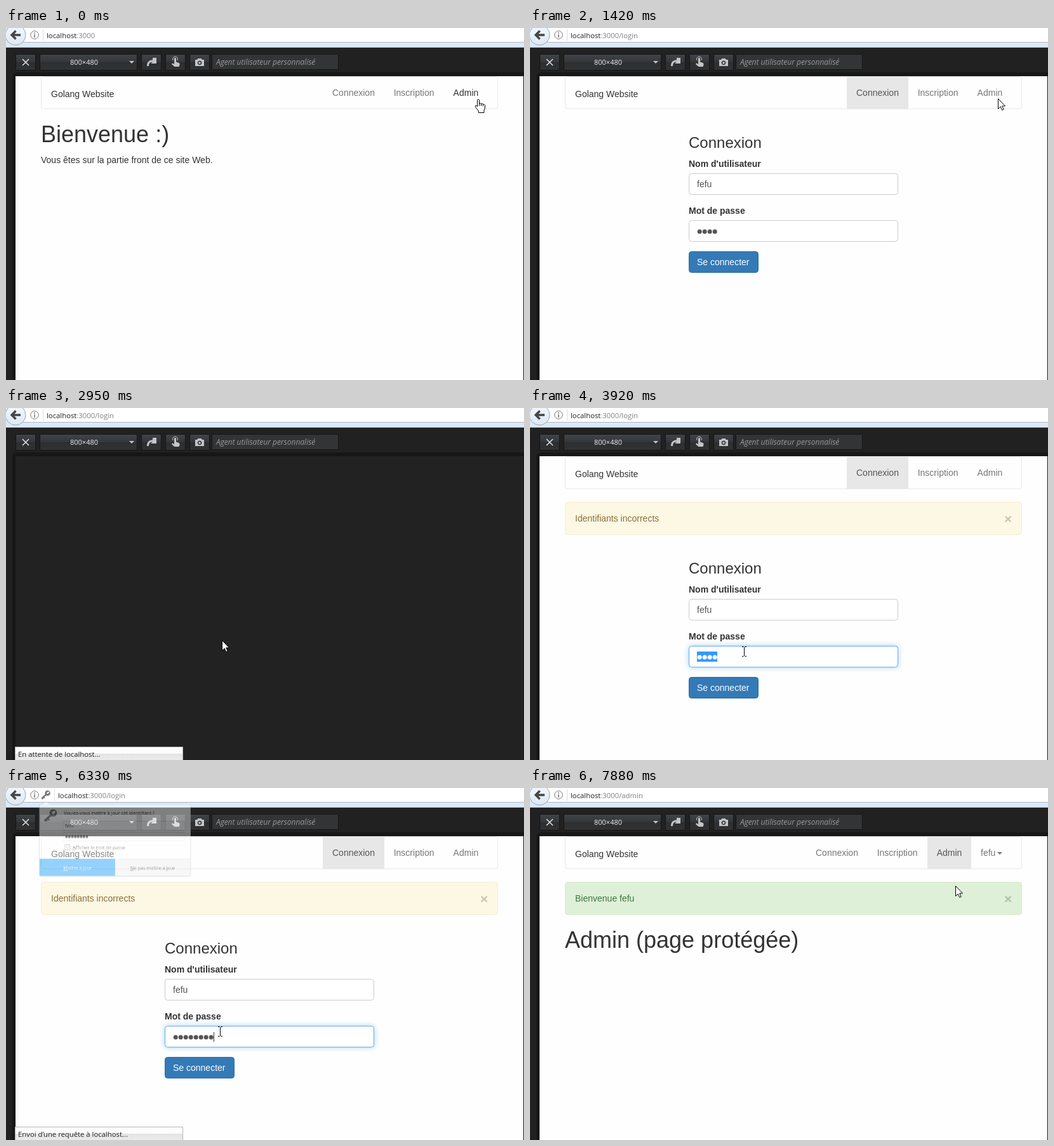
An HTML page for the animation above (8 s loop, 816 by 555 pixels).

```html
<!DOCTYPE html>
<html lang="fr">
<head>
<meta charset="utf-8">
<title>Golang Website</title>
<style>
html, body { margin: 0; width: 100%; height: 100%; overflow: hidden; background: #212121; }
svg { display: block; width: 816px; height: 555px; }
text { font: 14px "Liberation Sans", Arial, sans-serif; fill: #333; white-space: pre; }
.ui text, text.ui { font: 11.3px "Open Sans", "Noto Sans", sans-serif; fill: #222; }
.url .path { fill: #808080; }
.nav text { fill: #777; }
.nav .brand { font-size: 18px; }
.nav .on { fill: #555; }
.nav .hover { fill: #333; }
.h1 { font-size: 36px; }
.h3 { font-size: 24px; }
.b { font-weight: bold; }
.x { font-size: 21px; font-weight: bold; fill: #000; opacity: .2; }
.u { text-decoration: underline; }
.field { fill: #fff; stroke: #ccc; }
.value { fill: #555; }
.dots { fill: none; stroke: #555; stroke-width: 7; stroke-linecap: round; stroke-dasharray: 0 8; }
.focus { fill: #fff; stroke: #66afe9; filter: drop-shadow(0 0 4px rgba(102,175,233,.6)); }
.key { fill: none; stroke: #6e6e6e; }

/* One percent of the loop is 80 ms. */
.t { animation: 8s step-end -10ms infinite; }
#home, #urlHome { animation-name: home; }
#urlLogin { animation-name: urlLogin; }
#urlAdmin { animation-name: urlAdmin; }
#url { animation-name: urlShift; }
#urlKey { animation-name: urlKey; }
#paper { animation-name: paper; }
#login { animation-name: login; }
#form { animation-name: form; }
#alert { animation-name: alert; }
#button { animation-name: button; }
#glow { animation-name: glow; }
#typed { animation-name: typed; }
#caret { animation-name: caret; }
#selection { animation-name: selection; }
#admin { animation-name: admin; }
#wait { animation-name: wait; }
#send { animation-name: send; }
#receive { animation-name: receive; }
#popup { animation-name: popup; transform-origin: 62.5px 21px; }
#cursor { animation-name: move; }
#arrow { animation-name: arrow; }
#hand { animation-name: hand; }
#beam { animation-name: beam; }

@keyframes home { 0% { opacity: 1 } 15.875%, 100% { opacity: 0 } }
@keyframes urlLogin { 0% { opacity: 0 } 15.875% { opacity: 1 } 80.875%, 100% { opacity: 0 } }
@keyframes urlAdmin { 0% { opacity: 0 } 80.875%, 100% { opacity: 1 } }
@keyframes urlShift { 0% { transform: none } 79.125% { transform: translateX(18px) } 98.5%, 100% { transform: none } }
@keyframes urlKey { 0% { opacity: 0 } 79.125% { opacity: 1 } 98.5%, 100% { opacity: 0 } }
@keyframes paper {
  0%, 17.75%, 38.625%, 82.5%, 100% { opacity: 1 }
  15.875%, 36.875%, 80.875% { opacity: 0 }
}
@keyframes login { 0%, 36.875%, 80.875%, 100% { opacity: 0 } 17.75%, 38.625% { opacity: 1 } }
@keyframes form { 0% { transform: none } 36.875%, 100% { transform: translateY(72px) } }
@keyframes alert { 0% { opacity: 0 } 36.875%, 100% { opacity: 1 } }
@keyframes button {
  0%, 36.875%, 100% { fill: #337ab7; stroke: #2e6da4 }
  33.375% { fill: #286090; stroke: #204d74 }
  35% { fill: #204d74; stroke: #122b40 }
}
@keyframes glow { 0% { opacity: 0 } 45.875% { opacity: .6 } 47.5%, 100% { opacity: 1 } }
@keyframes typed {
  0% { transform: translateX(32px) }
  63.75% { transform: translateX(8px) }
  67.25% { transform: translateX(16px) }
  69% { transform: translateX(24px) }
  70.75% { transform: translateX(32px) }
  72.5% { transform: translateX(40px) }
  74.25% { transform: translateX(56px) }
  75.875%, 100% { transform: translateX(64px) }
}
@keyframes caret { 0%, 49% { opacity: 0 } 45.875%, 63.75%, 100% { opacity: 1 } }
@keyframes selection { 0% { opacity: 0 } 49% { opacity: 1 } 63.75%, 100% { opacity: 0 } }
@keyframes admin { 0% { opacity: 0 } 84.375%, 100% { opacity: 1 } }
@keyframes wait {
  0%, 17.75%, 38.625%, 82.5%, 100% { opacity: 0 }
  2%, 36.875%, 80.875% { opacity: 1 }
}
@keyframes send { 0% { opacity: 0 } 79.125% { opacity: 1 } 80.875%, 100% { opacity: 0 } }
@keyframes receive { 0% { opacity: 0 } 82.5% { opacity: 1 } 84.375%, 100% { opacity: 0 } }
@keyframes popup {
  0% { opacity: 0; transform: none }
  79.125% { opacity: .43; transform: scale(.656) }
  80.875% { opacity: 1; transform: none }
  96.75% { opacity: .5; transform: none }
  98.5%, 100% { opacity: 0; transform: none }
}
@keyframes move {
  0% { transform: translate(744px, 112px) }
  3.75% { transform: translate(737px, 111px) }
  24.75% { transform: translate(704px, 153px) }
  26.5% { transform: translate(600px, 225px) }
  28.25% { transform: translate(480px, 300px) }
  30% { transform: translate(395px, 345px) }
  31.625% { transform: translate(355px, 362px) }
  33.375% { transform: translate(340px, 366px) }
  44.125% { transform: translate(338px, 378px) }
  45.875% { transform: translate(337px, 384px) }
  80.875% { transform: translate(335px, 383px) }
  87.875% { transform: translate(352px, 375px) }
  89.625% { transform: translate(420px, 320px) }
  91.375% { transform: translate(520px, 240px) }
  93.125% { transform: translate(620px, 180px) }
  94.875%, 100% { transform: translate(670px, 154px) }
}
@keyframes arrow { 0%, 33.375%, 44.125% { opacity: 0 } 3.75%, 36.875%, 80.875%, 100% { opacity: 1 } }
@keyframes hand { 0%, 33.375% { opacity: 1 } 3.75%, 36.875%, 100% { opacity: 0 } }
@keyframes beam { 0%, 80.875%, 100% { opacity: 0 } 44.125% { opacity: 1 } }
</style>
</head>
<body>
<svg viewBox="0 0 816 555">
  <defs>
    <linearGradient id="metal" x2="0" y2="1">
      <stop offset="0" stop-color="#404347"/><stop offset=".5" stop-color="#34373a"/>
      <stop offset=".5" stop-color="#2c2e30"/><stop offset="1" stop-color="#303234"/>
    </linearGradient>
    <linearGradient id="bar" x2="0" y2="1">
      <stop offset="0" stop-color="#fff"/><stop offset=".5" stop-color="#fbfbfb"/>
      <stop offset=".5" stop-color="#e4e4e4"/><stop offset="1" stop-color="#ececec"/>
    </linearGradient>
    <linearGradient id="round" x2="0" y2="1">
      <stop offset="0" stop-color="#f4f8fd"/><stop offset="1" stop-color="#dce8f5"/>
    </linearGradient>
    <g id="frame">
      <rect x="55.5" y="76.5" width="719" height="51" rx="4" fill="none" stroke="#e7e7e7"/>
      <text class="brand" x="71" y="109">Golang Website</text>
    </g>
    <g id="keyIcon" class="key">
      <circle cx="80.500" cy="49" r="6" stroke-width="6"/>
      <circle cx="83" cy="46.500" r="2.500" fill="#fff" stroke="none"/>
      <path d="M75 54L60 68" stroke-width="5"/>
      <path d="M67 62l4 4M62 66l3 3" stroke-width="3.500"/>
    </g>
  </defs>

  <!-- browser chrome -->
  <rect width="816" height="555" fill="#212121"/>
  <rect width="816" height="31" fill="#dbe9f8"/>
  <rect x="18" width="798" height="22" fill="#fff"/>
  <path d="M18 22.500H816" stroke="#a9b7c6"/>
  <path d="M0 30.500H816" stroke="#b4c1cf"/>
  <circle cx="15" cy="11" r="16" fill="url(#round)" stroke="#9aa5b1"/>
  <path d="M9.500 11H23M15.500 4.500L9 11l6.500 6.500" fill="none" stroke="#454545" stroke-width="3.400"/>
  <circle cx="45" cy="11" r="6.300" fill="#fff" stroke="#777"/>
  <path d="M45 7v1.700M45 10v5" stroke="#777" stroke-width="1.600"/>

  <!-- responsive toolbar -->
  <g fill="url(#metal)" stroke="#151515">
    <rect x="15.500" y="41.500" width="31" height="25"/>
    <rect x="53.500" y="41.500" width="153" height="25"/>
    <rect x="213.500" y="41.500" width="31" height="25"/>
    <rect x="251.500" y="41.500" width="31" height="25"/>
    <rect x="289.500" y="41.500" width="31" height="25"/>
    <rect x="324.500" y="41.500" width="199" height="24" rx="1" fill="#333436"/>
  </g>
  <path d="M26 49l10 10M36 49l-10 10" stroke="#e4e4e4" stroke-width="1.500"/>
  <g fill="#c3c5c7">
    <path d="M194 52h8l-4 4z"/>
    <path d="M222 60c0-7 4-9.500 9-9.500V47l6 0v9h-9l3-2.500c-4 0-6 2-6 6.500z"/>
    <path d="M265 47.500q1.500-1 3 0v6l4.500 1.500q1.500 1 1 3l-1 3h-7l-4.500-4q0-1.500 1.500-1.500l2.500 1.500z"/>
    <path fill-rule="evenodd" d="M298 50h3l1.500-2h5l1.500 2h3v10h-14zM305 51.500a3.400 3.400 0 1 0 .1 0z"/>
    <circle cx="305" cy="55" r="1.800"/>
  </g>
  <path d="M263 51a4 4 0 1 1 7 0" fill="none" stroke="#c3c5c7"/>
  <g class="ui">
    <text x="123" y="58" text-anchor="middle" style="font-size:11px;fill:#eee">800×480</text>
    <text x="331" y="58" style="font-size:12px;font-style:italic;fill:#999">Agent utilisateur personnalisé</text>
  </g>

  <g id="url" class="t">
    <path d="M58.500 2V20" stroke="#ddd"/>
    <g class="ui url">
      <text id="urlHome" class="t" x="64" y="16">localhost<tspan class="path">:3000</tspan></text>
      <text id="urlLogin" class="t" x="64" y="16">localhost<tspan class="path">:3000/login</tspan></text>
      <text id="urlAdmin" class="t" x="64" y="16">localhost<tspan class="path">:3000/admin</tspan></text>
    </g>
  </g>
  <g id="urlKey" class="t"><use href="#keyIcon" transform="translate(28.500 -14.500) scale(.46)"/></g>

  <!-- viewport -->
  <path d="M10 555V78q0-8 8-8H816V555z" fill="#171717"/>
  <rect x="15" y="76" width="800" height="479" fill="#222"/>
  <rect id="paper" class="t" x="15" y="76" width="800" height="479" fill="#fefefe"/>

  <g id="home" class="t">
    <g class="nav">
      <use href="#frame"/>
      <text x="514" y="107">Connexion</text>
      <text x="610.700" y="107">Inscription</text>
      <text class="hover" x="704.600" y="107">Admin</text>
    </g>
    <text class="h1" x="55" y="180">Bienvenue :)</text>
    <text x="55" y="213">Vous êtes sur la partie front de ce site Web.</text>
  </g>

  <g id="login" class="t">
    <g class="nav">
      <use href="#frame"/>
      <rect x="499" y="77" width="97" height="50" fill="#e7e7e7"/>
      <text class="on" x="514" y="107">Connexion</text>
      <text x="610.700" y="107">Inscription</text>
      <text x="704.600" y="107">Admin</text>
    </g>
    <g id="alert" class="t">
      <rect x="55.500" y="148.500" width="719" height="51" rx="4" fill="#fcf8e3" stroke="#faebcc"/>
      <text x="71" y="179" style="fill:#8a6d3b">Identifiants incorrects</text>
      <text class="x" x="747" y="181.500">×</text>
    </g>
    <g id="form" class="t">
      <text class="h3" x="250" y="189">Connexion</text>
      <text class="b" x="250" y="219">Nom d'utilisateur</text>
      <rect class="field" x="250.500" y="229.500" width="329" height="33" rx="4"/>
      <text class="value" x="263" y="251">fefu</text>
      <text class="b" x="250" y="293">Mot de passe</text>
      <rect class="field" x="250.500" y="303.500" width="329" height="33" rx="4"/>
      <rect id="glow" class="t focus" x="250.500" y="303.500" width="329" height="33" rx="4"/>
      <path class="dots" d="M267.200 321h57"/>
      <g id="typed" class="t">
        <rect x="263" y="313" width="70" height="16" fill="#fff"/>
        <path id="caret" class="t" d="M263.500 313v15" stroke="#333"/>
      </g>
      <g id="selection" class="t">
        <rect x="263" y="312" width="32" height="16" fill="#3399ff"/>
        <path class="dots" d="M267.200 321h25" style="stroke:#fff"/>
      </g>
      <rect id="button" class="t" x="250.500" y="352.500" width="109" height="33" rx="4"/>
      <text x="263" y="374" style="fill:#fff">Se connecter</text>
    </g>
  </g>

  <g id="admin" class="t">
    <g class="nav">
      <use href="#frame"/>
      <rect x="626" y="77" width="69" height="50" fill="#e7e7e7"/>
      <text x="450" y="107">Connexion</text>
      <text x="546.700" y="107">Inscription</text>
      <text class="on" x="640.700" y="107">Admin</text>
      <text x="710" y="107">fefu</text>
      <path d="M736 101h8l-4 4z" fill="#777"/>
    </g>
    <rect x="55.500" y="148.500" width="719" height="51" rx="4" fill="#dff0d8" stroke="#d6e9c6"/>
    <text x="71" y="179" style="fill:#3c763d">Bienvenue fefu</text>
    <text class="x" x="747" y="181.500">×</text>
    <text class="h1" x="55" y="252">Admin (page protégée)</text>
  </g>

  <!-- status line -->
  <g class="ui" fill="url(#bar)" stroke="#b5b5b5">
    <g id="wait" class="t">
      <rect x="14.500" y="534.500" width="264" height="22"/>
      <text x="19" y="550" stroke="none">En attente de localhost...</text>
    </g>
    <g id="send" class="t">
      <rect x="14.500" y="534.500" width="264" height="22"/>
      <text x="19" y="550" stroke="none">Envoi d’une requête à localhost...</text>
    </g>
    <g id="receive" class="t">
      <rect x="14.500" y="534.500" width="299" height="22"/>
      <text x="19" y="550" stroke="none">Données transférées depuis maxcdn.bootstrapcdn.com</text>
    </g>
  </g>

  <!-- password panel -->
  <g id="popup" class="t ui">
    <path d="M51 28.500H54L63.500 20L73 28.500H407q3.500 0 3.500 3.500V197q0 3.500-3.500 3.500H51q-3.500 0-3.500-3.500V32q0-3.500 3.500-3.500z"
      fill="#fff" stroke="#bdbdbd" style="filter:drop-shadow(0 1px 1px rgba(0,0,0,.25))"/>
    <use href="#keyIcon"/>
    <text x="106" y="53">Voulez-vous mettre à jour cet identifiant ?</text>
    <g fill="#fff" stroke="#d5d9df">
      <rect x="104.500" y="69.500" width="291" height="21"/>
      <rect x="104.500" y="95.500" width="291" height="21"/>
      <path d="M104 69.500H396M104 95.500H396" stroke="#abadb3"/>
      <rect x="108.500" y="125.500" width="12" height="12" stroke="#8e8f8f"/>
    </g>
    <rect x="111" y="128" width="7" height="7" fill="#dcdfe2"/>
    <text x="109" y="84">fefu</text>
    <path class="dots" d="M112.500 106.500h50" style="stroke:#000;stroke-width:6;stroke-dasharray:0 7"/>
    <text x="127" y="136"><tspan class="u">A</tspan>fficher le mot de passe</text>
    <path d="M48 159H229V200H51q-3 0-3-3z" fill="#0996f8"/>
    <path d="M229 159H410V197q0 3-3 3H229z" fill="#eee"/>
    <path d="M229 159.500H410" stroke="#d0d0d0"/>
    <text x="139" y="185" text-anchor="middle" style="fill:#fff"><tspan class="u">M</tspan>ettre à jour</text>
    <text x="319.500" y="185" text-anchor="middle"><tspan class="u">N</tspan>e pas mettre à jour</text>
  </g>

  <g id="cursor" class="t">
    <path id="arrow" class="t" d="M.5.5V16.500L4.200 13L6.800 18.500L9.200 17.400L6.700 12H11.500z" fill="#fff" stroke="#000"/>
    <g id="hand" class="t" fill="#fff" stroke="#000" stroke-linejoin="round">
      <path d="M-1.500 1.500q1.500-2.500 3 0V7q1.500-1 3 .5q1.500-.8 3 .8q2-.8 3 1.200V14L9 18V21.500H.500V19L-4.500 12.500q-.8-2.500 1-2.500L-1.500 12z"/>
      <path d="M1.500 7v4M4.500 7.500v3.500M7.500 8.500v3" fill="none"/>
    </g>
    <path id="beam" class="t" d="M-3 -7.500H-.5M1.500 -7.500H4M.5 -7V7M-3 7.500H-.5M1.500 7.500H4" fill="none" stroke="#000"/>
  </g>
</svg>
</body>
</html>
```
